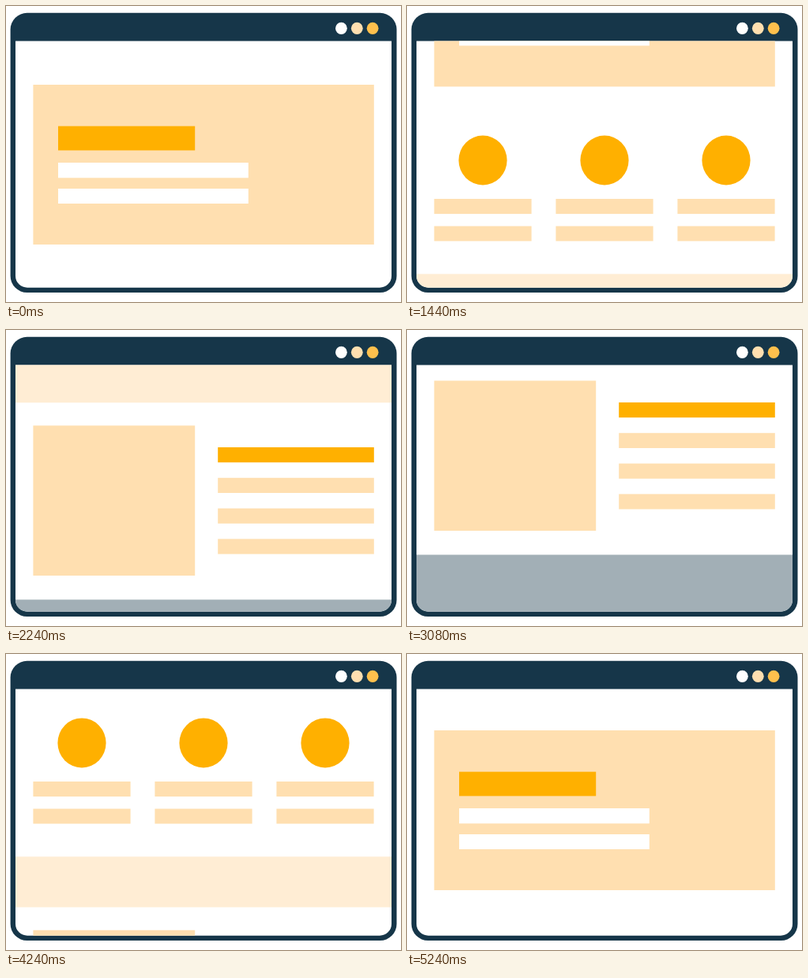
An HTML page with a canvas that plays this animation: 500 by 376 pixels, repeating every 5.28 s.

```html
<!DOCTYPE html>
<html lang="en">
<head>
<meta charset="utf-8">
<title>Scrolling page</title>
<style>
  html, body { margin: 0; width: 100%; height: 100%; overflow: hidden; background: #fff; }
  canvas { display: block; width: 500px; height: 376px; }
</style>
</head>
<body>
<canvas id="stage"></canvas>
<script>
const LOOP = 5280, STEP = 40;
const DOWN = 600, UP = 3240;
const NAVY = '#163649', ORANGE = '#ffb000', PEACH = '#ffdfb0', CREAM = '#ffedd4', GREY = '#a2afb6';

// Scroll distance against time since the move began
const KNOTS = [
  [0, 0], [520, 42.5], [600, 76], [1120, 343.5], [1360, 433.5],
  [1640, 513], [1840, 556], [2000, 567], [2040, 570]
];
const last = KNOTS.length - 1;
const slope = i => (KNOTS[i + 1][1] - KNOTS[i][1]) / (KNOTS[i + 1][0] - KNOTS[i][0]);
const tangents = KNOTS.map((_, i) => {
  if (i === 0 || i === last) return 0;
  const a = slope(i - 1), b = slope(i);
  return 2 * a * b / (a + b);
});

const canvas = document.getElementById('stage');
const ctx = canvas.getContext('2d');
const ratio = window.devicePixelRatio || 1;
canvas.width = 500 * ratio;
canvas.height = 376 * ratio;

// Smooth monotone curve through the knots
function travel(t) {
  if (t <= 0) return 0;
  if (t >= KNOTS[last][0]) return KNOTS[last][1];
  const i = KNOTS.findIndex(k => k[0] > t) - 1;
  const [t0, y0] = KNOTS[i], [t1, y1] = KNOTS[i + 1];
  const h = t1 - t0, u = (t - t0) / h, v = 1 - u;
  return y0 * (1 + 2 * u) * v * v + y1 * u * u * (3 - 2 * u)
    + h * (tangents[i] * u * v * v - tangents[i + 1] * u * u * v);
}

function rect(color, x0, y0, x1, y1) {
  ctx.fillStyle = color;
  ctx.fillRect(x0, y0, x1 - x0, y1 - y0);
}

function oval(color, x, y, rx, ry) {
  ctx.fillStyle = color;
  ctx.beginPath();
  ctx.ellipse(x, y, rx, ry, 0, 0, Math.PI * 2);
  ctx.fill();
}

function page() {
  // Hero
  rect(PEACH, 34.4, 100, 465.8, 303);
  rect(ORANGE, 66, 152.6, 239.2, 183.4);
  rect('#fff', 66, 199, 306.8, 218.3);
  rect('#fff', 66, 232, 306.8, 251);

  // Three columns
  for (let i = 0; i < 3; i++) {
    const x = 96 + 154 * i;
    oval(ORANGE, x, 396.6, 30.6, 31.5);
    rect(PEACH, x - 61.6, 445.6, x + 61.6, 464.7);
    rect(PEACH, x - 61.6, 480.2, x + 61.6, 499.2);
  }

  // Banner
  rect(CREAM, 12, 541, 488, 605.3);

  // Picture and text
  rect(PEACH, 34.4, 634.4, 239.2, 825);
  for (let i = 0; i < 4; i++) {
    const y = 662 + 38.8 * i;
    rect(i ? PEACH : ORANGE, 268.2, y, 465.8, y + 19.2);
  }

  // Footer
  rect(GREY, 12, 855.5, 488, 960);
}

function draw(t) {
  ctx.setTransform(ratio, 0, 0, ratio, 0, 0);
  rect('#fff', 0, 0, 500, 376);

  ctx.fillStyle = NAVY;
  ctx.beginPath();
  ctx.roundRect(5.6, 8.8, 488.9, 355.2, 21);
  ctx.fill();

  oval('#fff', 424.4, 28.3, 7.4, 7.6);
  oval(PEACH, 444.3, 28.3, 7.4, 7.6);
  oval('#ffc04d', 464.1, 28.3, 7.4, 7.6);

  ctx.save();
  ctx.beginPath();
  ctx.roundRect(12, 44.5, 476, 313.2, [0, 0, 15, 15]);
  ctx.fillStyle = '#fff';
  ctx.fill();
  ctx.clip();
  ctx.translate(0, travel(t - UP) - travel(t - DOWN));
  page();
  ctx.restore();
}

const start = performance.now();
function tick() {
  const t = (performance.now() - start) % LOOP;
  draw(Math.floor(t / STEP) * STEP);
  requestAnimationFrame(tick);
}
tick();
</script>
</body>
</html>
```
